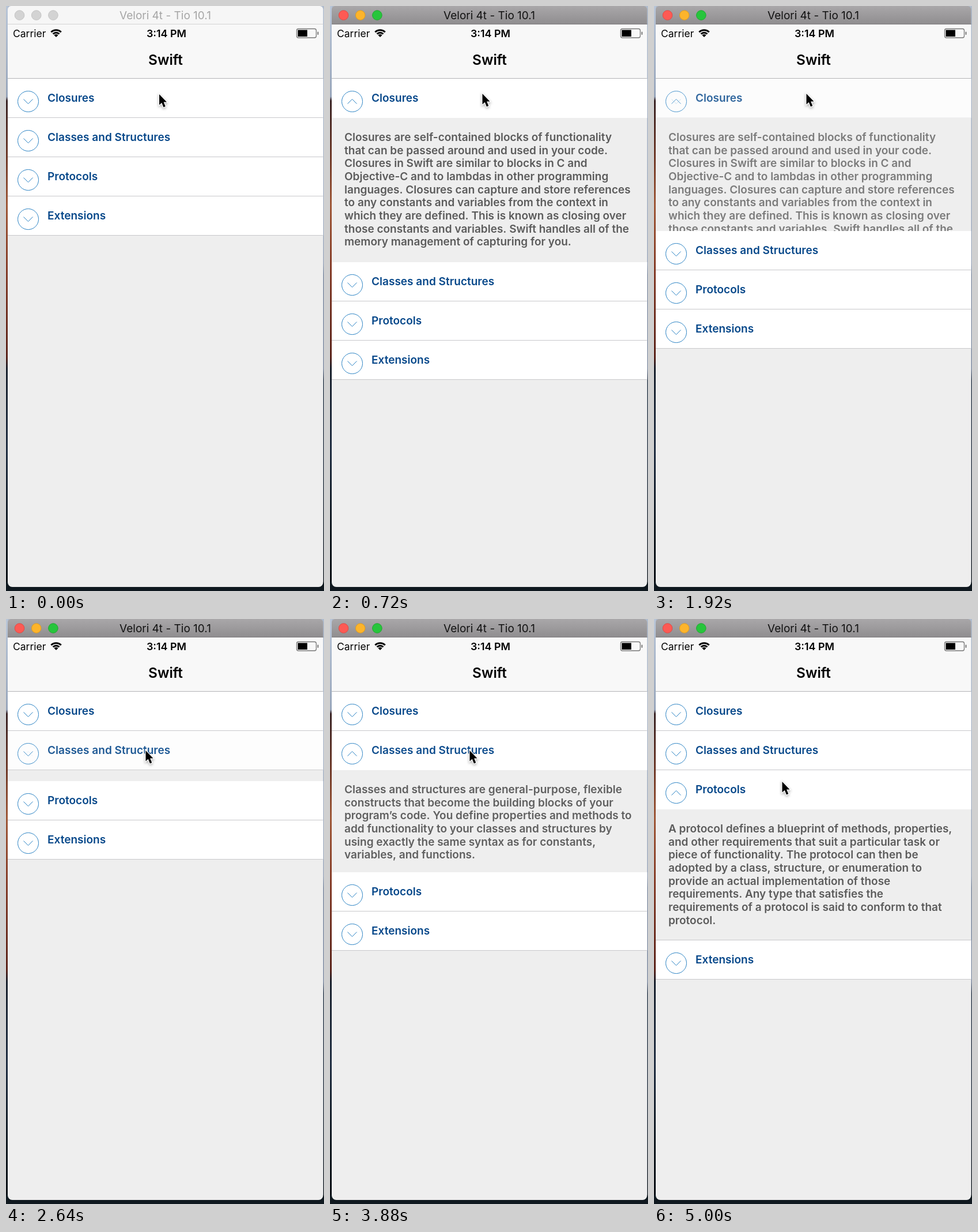
An HTML page with a canvas that plays this animation: 552 px wide and 1014 px high, repeating every 5.04 s.

```html
<!DOCTYPE html>
<html lang="en">
<head>
<meta charset="utf-8">
<title>Expandable list</title>
<style>
  html, body { margin: 0; width: 100%; height: 100%; overflow: hidden; }
  canvas { display: block; }
</style>
</head>
<body>
<canvas id="stage" width="552" height="1014"></canvas>
<script>
const ctx = document.getElementById('stage').getContext('2d');
const LOOP = 5040, STEP = 40, FADE = 300;
const ROW = 68, TOP = 126, LINE = 22.65;
const LEFT = 3, RIGHT = 550.5;
const ACTIVATE = 280;

const rows = [
  { title: 'Closures', open: 426, close: 1830, text: [
    'Closures are self-contained blocks of functionality',
    'that can be passed around and used in your code.',
    'Closures in Swift are similar to blocks in C and',
    'Objective-C and to lambdas in other programming',
    'languages. Closures can capture and store references',
    'to any constants and variables from the context in',
    'which they are defined. This is known as closing over',
    'those constants and variables. Swift handles all of the',
    'memory management of capturing for you.'] },
  { title: 'Classes and Structures', open: 2580, close: 3852, text: [
    'Classes and structures are general-purpose, flexible',
    'constructs that become the building blocks of your',
    'program’s code. You define properties and methods to',
    'add functionality to your classes and structures by',
    'using exactly the same syntax as for constants,',
    'variables, and functions.'] },
  { title: 'Protocols', open: 4600, close: Infinity, text: [
    'A protocol defines a blueprint of methods, properties,',
    'and other requirements that suit a particular task or',
    'piece of functionality. The protocol can then be',
    'adopted by a class, structure, or enumeration to',
    'provide an actual implementation of those',
    'requirements. Any type that satisfies the',
    'requirements of a protocol is said to conform to that',
    'protocol.'] },
  { title: 'Extensions', open: Infinity, close: Infinity, text: [] }
];

// Pointer stops: time, x, y
const pointer = [
  [0, 266, 153], [400, 264.5, 152], [2050, 264.5, 152], [2420, 242.5, 228],
  [4080, 242.5, 228], [4480, 222.5, 282], [LOOP, 222.5, 282]
];

function ease(time, start, length) {
  const k = Math.min(1, Math.max(0, (time - start) / length));
  return k * k * (3 - 2 * k);
}

function rect(x, y, w, h, fill) {
  ctx.fillStyle = fill;
  ctx.fillRect(x, y, w, h);
}

function gradient(y0, y1, ...stops) {
  const g = ctx.createLinearGradient(0, y0, 0, y1);
  stops.forEach(([at, color]) => g.addColorStop(at, color));
  return g;
}

function text(str, x, y, size, weight, color, align = 'left') {
  ctx.font = `${weight} ${size}px Inter, sans-serif`;
  ctx.textAlign = align;
  ctx.fillStyle = color;
  ctx.fillText(str, x, y);
}

function disc(x, y, r, fill, stroke) {
  ctx.beginPath();
  ctx.arc(x, y, r, 0, 7);
  if (fill) { ctx.fillStyle = fill; ctx.fill(); }
  ctx.strokeStyle = stroke;
  ctx.lineWidth = 1;
  ctx.stroke();
}

function wallpaper() {
  rect(0, 0, 552, 1014, '#b0bccd');
  rect(0, 0, LEFT, 1014, gradient(0, 1014,
    [0, '#b9c6d8'], [.155, '#98a6bb'], [.162, '#3c2728'], [.26, '#713b2a'],
    [.34, '#a05a3a'], [.45, '#863e2a'], [.6, '#5c251c'], [.62, '#1c2430'],
    [.76, '#223044'], [.9, '#10181f'], [1, '#0a0f14']));
  rect(RIGHT, 0, 2, 1014, gradient(0, 1014,
    [0, '#b0bccd'], [.44, '#98a4b8'], [.46, '#728097'], [.62, '#78859c'],
    [.64, '#222f40'], [.8, '#202b39'], [1, '#0b1015']));
  rect(0, 998, 552, 16, '#0f181f');
}

function titleBar(active) {
  rect(LEFT, 0, 548, 32, active
    ? gradient(0, 32, [0, '#a9a7a9'], [1, '#8f8d8f']) : '#f6f6f6');
  rect(LEFT, 31, 548, 1, active ? '#7f7d7f' : '#d3d3d3');
  const lights = active ? ['#fd5a54', '#fdb42b', '#27c53c'] : Array(3).fill('#d3d3d3');
  const rims = active ? ['#e04a45', '#dd9c22', '#1ea92e'] : Array(3).fill('#c3c3c3');
  lights.forEach((c, i) => disc(23.5 + 29.2 * i, 16, 8.3, c, rims[i]));
  text('Velori 4t - Tio 10.1', 276.5, 23, 19, 400, active ? '#111' : '#a5a5a5', 'center');
}

function statusBar() {
  rect(LEFT, 32, 548, 94, '#f8f8f8');
  text('Carrier', 12, 53.5, 17.5, 400, '#000');
  text('3:14 PM', 278.5, 53.5, 17.9, 600, '#000', 'center');
  text('Swift', 277, 102, 24.4, 600, '#000', 'center');

  ctx.strokeStyle = '#000';
  for (const [r, w] of [[12.3, 3], [7.7, 3], [2.5, 5]]) {
    ctx.lineWidth = w;
    ctx.beginPath();
    ctx.arc(87, 54, r, -Math.PI * .75, -Math.PI * .25);
    ctx.stroke();
  }

  ctx.strokeStyle = '#777';
  ctx.lineWidth = 1.3;
  ctx.beginPath();
  ctx.roundRect(504.5, 39.5, 34, 15.5, 3);
  ctx.stroke();
  rect(506.5, 41.5, 16.5, 11.5, '#000');
  ctx.fillStyle = '#777';
  ctx.beginPath();
  ctx.roundRect(540.5, 44.5, 2, 5.5, 1);
  ctx.fill();
}

// One-pixel line ending at y
function separator(y, alpha = 1) {
  ctx.globalAlpha = alpha;
  rect(LEFT, y - 1, 548, 1, '#c8c8cb');
  ctx.globalAlpha = 1;
}

function chevron(y, dir, alpha) {
  ctx.globalAlpha = alpha;
  ctx.beginPath();
  ctx.moveTo(30.5, y - 4 * dir);
  ctx.lineTo(38.5, y + 4 * dir);
  ctx.lineTo(46.5, y - 4 * dir);
  ctx.stroke();
}

// Closed and open cells dissolve into each other, dimming halfway
function cell(title, y, p) {
  ctx.globalAlpha = 1 - p * (1 - p);
  rect(LEFT, y, 548, ROW, '#fff');
  text(title, 72, y + 40, 19.05, 600, '#07488a');
  disc(38.5, y + 39.5, 18, null, '#2b83c4');
  chevron(y + 39.5, 1, 1 - p);
  chevron(y + 39.5, -1, p);
  ctx.globalAlpha = 1;
}

function detail(lines, y, height, alpha) {
  ctx.save();
  ctx.beginPath();
  ctx.rect(LEFT, y, 548, height);
  ctx.clip();
  ctx.globalAlpha = alpha;
  lines.forEach((s, i) => text(s, 25, y + 40 + i * LINE, 19, 600, '#5b5b5b'));
  ctx.restore();
}

function list(t) {
  rect(LEFT, TOP, 548, 882, '#eee');
  let y = TOP;
  for (const row of rows) {
    const p = ease(t, row.open, FADE) - ease(t, row.close, FADE);
    const height = Math.round(p * (row.text.length * LINE + 46));
    cell(row.title, y, p);
    y += ROW;
    if (p) detail(row.text, y, height, p);
    separator(y, 1 - p);
    y += height;
    if (p === 1) separator(y);
  }
  rect(LEFT, TOP - 1, 548, 1, '#b4b4b6');
}

function cursor(t) {
  const i = pointer.findIndex(s => s[0] > t);
  const [t0, x0, y0] = pointer[i - 1], [t1, x1, y1] = pointer[i];
  const k = ease(t, t0, t1 - t0);
  ctx.save();
  ctx.translate(x0 + (x1 - x0) * k, y0 + (y1 - y0) * k);
  ctx.scale(.93, .93);
  const arrow = new Path2D('M0 0V20L4.6 15.8 8 24.2 11.6 22.7 8.2 14.5H14Z');
  ctx.shadowColor = 'rgba(0,0,0,.35)';
  ctx.shadowBlur = 4;
  ctx.shadowOffsetY = 2;
  ctx.strokeStyle = '#fff';
  ctx.lineWidth = 2.6;
  ctx.stroke(arrow);
  ctx.shadowColor = 'transparent';
  ctx.fillStyle = '#000';
  ctx.fill(arrow);
  ctx.restore();
}

function draw(now) {
  const t = Math.floor(now % LOOP / STEP) * STEP;
  wallpaper();
  ctx.save();
  ctx.beginPath();
  ctx.roundRect(LEFT, 0, RIGHT - LEFT, 1007, [6, 6, 8, 8]);
  ctx.clip();
  titleBar(t >= ACTIVATE);
  statusBar();
  list(t);
  ctx.restore();
  cursor(t);
}

const start = performance.now();
function loop() {
  draw(performance.now() - start);
  requestAnimationFrame(loop);
}
loop();
</script>
</body>
</html>
```
